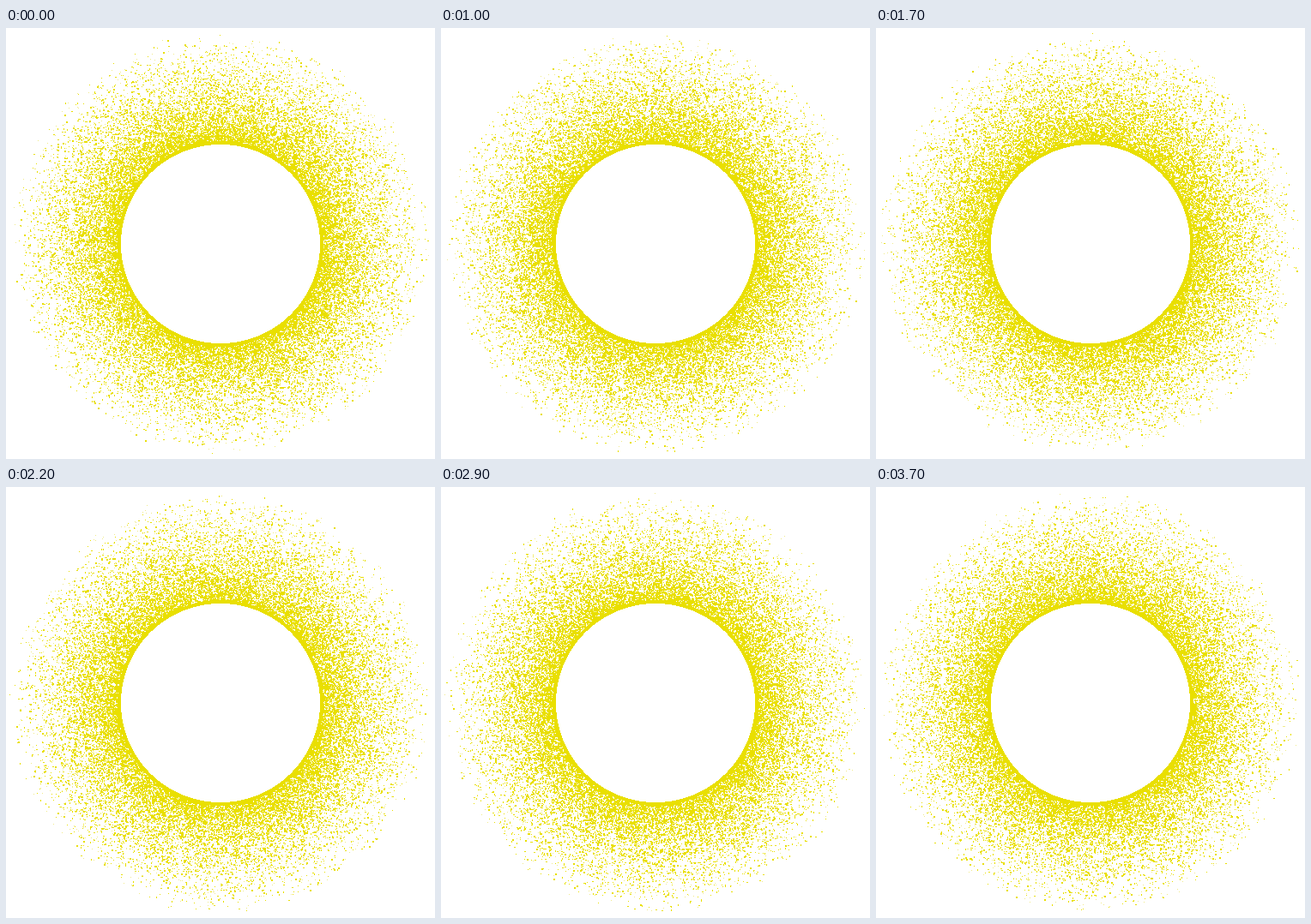
These frames come from a looping animation (500 by 503 pixels, 3.8 s). An HTML page with a canvas:

```html
<!DOCTYPE html>
<html lang="en">
<head>
<meta charset="utf-8">
<title>Corona</title>
<style>
  html, body { margin: 0; width: 100%; height: 100%; overflow: hidden; background: #fff; }
  canvas { display: block; }
</style>
</head>
<body>
<canvas id="stage" width="500" height="503"></canvas>
<script>
const ctx = document.getElementById('stage').getContext('2d');
const W = 500, H = 503;
const LOOP = 3800, STEP = 100, COUNT = 29000;
const CX = 250, CY = 252, INNER = 116, RIM = 4, REACH = 130;
const YELLOW = '#e9df00', PALE = '#f0eb8c';

let seed = 20771;
function rand() {
  seed = (seed + 0x6D2B79F5) | 0;
  let x = Math.imul(seed ^ (seed >>> 15), 1 | seed);
  x = (x + Math.imul(x ^ (x >>> 7), 61 | x)) ^ x;
  return ((x ^ (x >>> 14)) >>> 0) / 4294967296;
}

// Each grain leaves the ring and drifts straight out to its own distance.
const grains = Array.from({ length: COUNT }, () => {
  const a = rand() * Math.PI * 2;
  return {
    cos: Math.cos(a),
    sin: Math.sin(a),
    reach: REACH * Math.pow(rand(), 0.68),
    start: rand(),
    w: rand(),
    h: rand(),
    tone: rand()
  };
});

// Hard-edged pixels of the hole and of the solid rim around it.
const hole = new Path2D(), rim = new Path2D();
for (let y = 0; y < H; y++) {
  for (let x = 0; x < W; x++) {
    const r = Math.hypot(x + 0.5 - CX, y + 0.5 - CY);
    if (r < INNER + RIM) (r < INNER ? hole : rim).rect(x, y, 1, 1);
  }
}

function draw(time) {
  ctx.fillStyle = '#fff';
  ctx.fillRect(0, 0, W, H);
  const solid = [];
  ctx.fillStyle = PALE;
  for (const g of grains) {
    const d = g.reach * ((g.start + time / LOOP) % 1);
    const far = d / REACH;
    const r = INNER + 1 + d;
    const x = Math.round(CX + r * g.cos - 0.5);
    const y = Math.round(CY + r * g.sin - 0.5);
    const small = 0.45 + 0.25 * far;
    if (g.tone < 0.06 + 0.26 * far) ctx.fillRect(x, y, 1, 1);
    else solid.push(x, y, g.w < small ? 1 : 2, g.h < small ? 1 : 2);
  }
  ctx.fillStyle = YELLOW;
  for (let i = 0; i < solid.length; i += 4) {
    ctx.fillRect(solid[i], solid[i + 1], solid[i + 2], solid[i + 3]);
  }
  ctx.fill(rim);
  ctx.fillStyle = '#fff';
  ctx.fill(hole);
}

const t0 = performance.now();
let last = -1;
function tick() {
  const step = Math.floor(((performance.now() - t0) % LOOP) / STEP);
  if (step !== last) draw((last = step) * STEP);
  requestAnimationFrame(tick);
}
tick();
</script>
</body>
</html>
```
